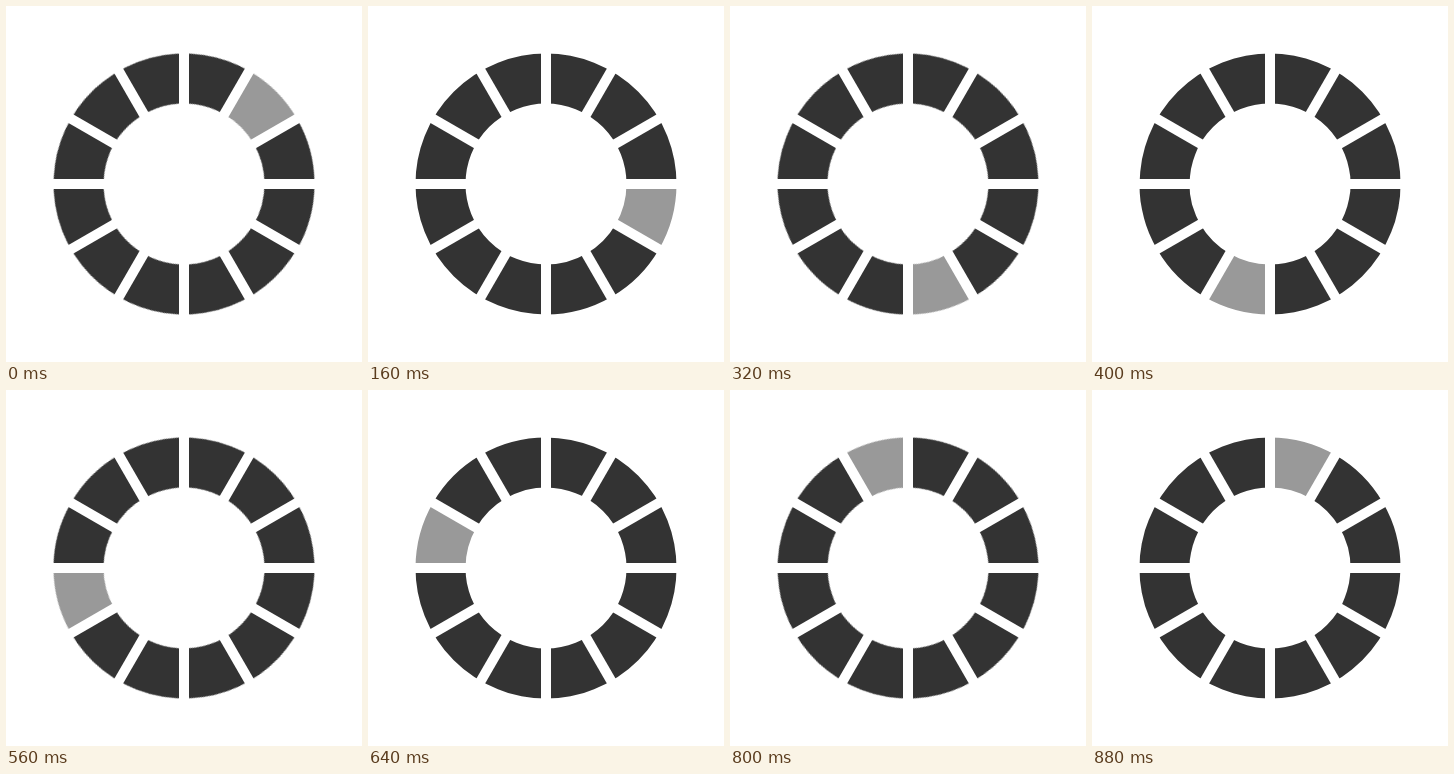
Write an HTML page that moves like this. It is 356 px wide and 356 px high and loops after 0.96 s.

```html
<!DOCTYPE html>
<html lang="en">
<head>
<meta charset="utf-8">
<title>Loading ring</title>
<style>
  html, body { margin: 0; width: 100%; height: 100%; overflow: hidden; background: #fff; }
  svg { display: block; width: 100%; height: 100%; }
  circle { fill: none; stroke-width: 50; }
  .dark { stroke: #333; stroke-dasharray: 11 1; stroke-dashoffset: -1; }
  .light { stroke: #999; stroke-dasharray: 1 11; }
  .gaps { stroke: #fff; stroke-width: 10; }
  /* the tiny head start keeps each step safely on its 80 ms mark */
  .ring { animation: turn 960ms steps(12) -1ms infinite; }
  @keyframes turn {
    from { transform: rotate(-60deg); }
    to { transform: rotate(300deg); }
  }
</style>
</head>
<body>
<svg viewBox="-178 -178 356 356">
  <g class="ring">
    <circle class="dark" r="105.5" pathLength="12"/>
    <circle class="light" r="105.5" pathLength="12"/>
  </g>
  <g class="gaps">
    <path id="gap" d="M0-140V140"/>
    <use href="#gap" transform="rotate(30)"/>
    <use href="#gap" transform="rotate(60)"/>
    <use href="#gap" transform="rotate(90)"/>
    <use href="#gap" transform="rotate(120)"/>
    <use href="#gap" transform="rotate(150)"/>
  </g>
</svg>
</body>
</html>
```
